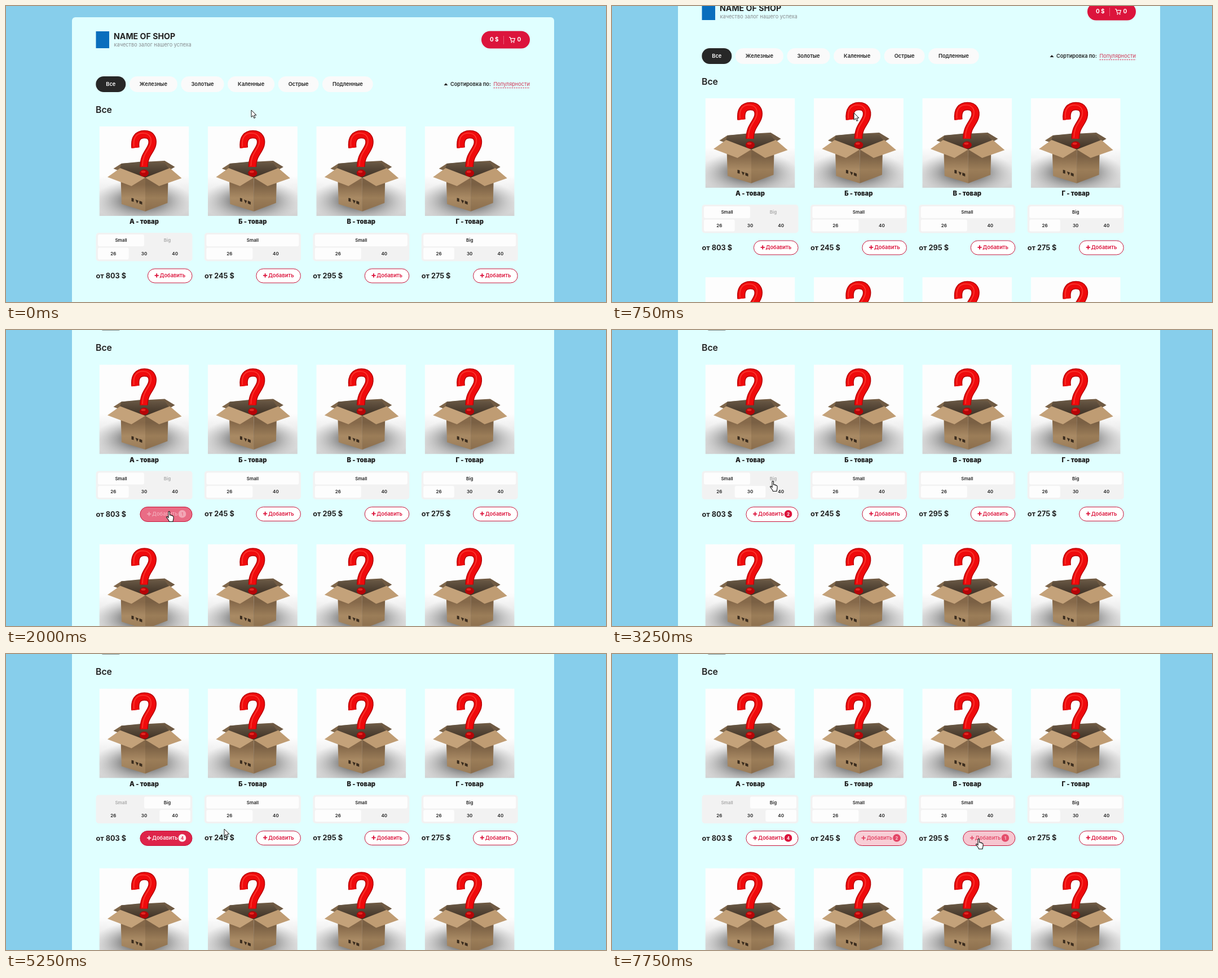
An HTML page that plays this animation: 1064x526 px, repeating every 8000 ms.

```html
<!DOCTYPE html>
<html lang="ru">
<head>
<meta charset="utf-8">
<title>Shop</title>
<style>
  html, body { margin: 0; width: 100%; height: 100%; overflow: hidden; background: #87ceeb; }
  svg { display: block; width: 1064px; height: 526px; font-family: Inter, "Open Sans", sans-serif; }
</style>
</head>
<body>
<svg viewBox="0 0 1064 526">
  <defs>
    <linearGradient id="floor" x2="0" y2="1">
      <stop offset=".55" stop-color="#fdfdfd"/><stop offset="1" stop-color="#d2d2d2"/>
    </linearGradient>
    <radialGradient id="shade">
      <stop offset=".35" stop-color="#666" stop-opacity=".8"/>
      <stop offset=".7" stop-color="#888" stop-opacity=".35"/>
      <stop offset="1" stop-color="#aaa" stop-opacity="0"/>
    </radialGradient>
    <linearGradient id="side" x2="0" y2="1">
      <stop offset=".2" stop-color="#86694a"/><stop offset=".6" stop-color="#a98a64"/><stop offset="1" stop-color="#9a7c58"/>
    </linearGradient>
    <linearGradient id="front" x2="0" y2="1">
      <stop offset=".2" stop-color="#7a6044"/><stop offset=".6" stop-color="#9b7d58"/><stop offset="1" stop-color="#8a6d4c"/>
    </linearGradient>
    <linearGradient id="inside" x2="0" y2="1">
      <stop offset="0" stop-color="#6b5a46"/><stop offset="1" stop-color="#3a2e23"/>
    </linearGradient>
    <clipPath id="crop"><rect width="159" height="159"/></clipPath>
    <path id="hook" fill="none" d="M64 38C62 21 69 14 80 14C92 14 96 23 93.500 33C90 45 79 51 79 72"/>
    <g id="photo" clip-path="url(#crop)">
      <rect width="159" height="159" fill="url(#floor)"/>
      <ellipse cx="77" cy="132" rx="88" ry="38" fill="url(#shade)"/>
      <path fill="#7f674b" d="M25 75L39 66L79 63L38 80Z"/>
      <path fill="#6f5a43" d="M79 63L116 61L134 72L122 79Z"/>
      <path fill="url(#inside)" d="M39 66L79 62L116 65L124 76L81.500 92L36 76Z"/>
      <ellipse cx="79.500" cy="83" rx="8" ry="6.500" fill="#b50508"/>
      <ellipse cx="78" cy="80.500" rx="4" ry="2" fill="#e62420"/>
      <path fill="url(#side)" d="M38 91L81.500 91L81.500 151L39.500 138Z"/>
      <path fill="url(#front)" d="M81.500 91L122 94L121 136L81.500 151Z"/>
      <path fill="#c4a27a" d="M37 74L81.500 91L57 106L14.500 90Z"/>
      <path fill="#bf9c73" d="M81.500 91L125 74L146 92L106 106Z"/>
      <path fill="#3a2c1e" d="M57 127l4 1v6l-4-1zM64 130l5.500 2-2.500 5zM71 132l5 2v5l-5-2z"/>
      <use href="#hook" stroke="#b80306" stroke-width="14.500"/>
      <use href="#hook" stroke="#f00a0c" stroke-width="11.500"/>
      <use href="#hook" stroke="#ff5a4a" stroke-width="1.500" opacity=".6" transform="translate(-2.500 -2)"/>
    </g>
    <path id="arrow" fill="#fff" stroke="#111" d="M0 0V12.500L2.900 9.800L4.900 14.400L7 13.500L5 9H9Z"/>
    <path id="hand" fill="#fff" stroke="#111" stroke-width="1.100" transform="translate(-5 0)" d="M4 1.500C4 0 6.500 0 6.500 1.500V7C8 6.400 9 7 9 7.600C10.200 7 11 7.800 11 8.400C12.300 8 13 8.800 13 9.800V13C13 15 12 16 12 18.500H5.500C5 16 3 14 .8 11.200C-.2 9.800 1.500 9 2.600 10L4 11.400Z"/>
  </defs>
  <g id="page"></g>
  <use id="cursor"/>
</svg>
<script>
const LOOP = 8000, STEP = 250, TICK = 10, FADE = 575;
const DARK = '#222', RED = '#dc143c', EDGE = '#c8143a';
const CARD_X = 159.5, CARD_Y = 214, PITCH = 192.4, ROW = 318;
const TYPE_Y = 192, SIZE_Y = 215.6, CELL_X = 3.5, CELL_H = 21, CELLS_W = 164;
const ADD_Y = 253, ADD_RIGHT = 170.5;
const $ = id => document.getElementById(id);

const tabs = ['Все', 'Железные', 'Золотые', 'Каленные', 'Острые', 'Подленные'];
const cards = [
  { name: 'А', price: 803, type: ['Small', 'Big'], size: [26, 30, 40] },
  { name: 'Б', price: 245, type: ['Small'], size: [26, 40] },
  { name: 'В', price: 295, type: ['Small'], size: [26, 40] },
  { name: 'Г', price: 275, type: ['Big'], size: [26, 30, 40] }
];

// stops of the pointer: time, x, y, click on arrival
const stops = [
  [0, 435, 185], [750, 429, 190], [1000, 301, 262], [2000, 289, 322, true],
  [2500, 246, 284, true], [3000, 282, 322, true], [3250, 285, 268], [3500, 285, 267, true],
  [4000, 300, 285, true], [4500, 290, 322, true], [4750, 290, 322, true], [5200, 290, 322],
  [5250, 387, 311], [6000, 461, 323, true], [6300, 437, 311], [6750, 437, 313],
  [7250, 461, 322, true], [7750, 650, 328, true]
];

const clamp = v => Math.min(1, Math.max(0, v));
const scrollAt = t => Math.round(305 * clamp((t - 628) / 372)) / 2;

function pointerAt(t) {
  const i = stops.findIndex(s => s[0] >= t);
  if (i < 1) return (i ? stops[stops.length - 1] : stops[0]).slice(1, 3);
  const [t0, x0, y0] = stops[i - 1], [t1, x1, y1] = stops[i];
  const k = 1 - (1 - (t - t0) / (t1 - t0)) ** 2;
  return [x0 + (x1 - x0) * k, y0 + (y1 - y0) * k];
}

const addBox = count => ({ x: count ? 78.4 : 91.9, h: count ? 26 : 25 });

// the control under the pointer
function hit([x, y], scroll, state) {
  const card = Math.floor((x - CARD_X) / PITCH);
  if (!state[card]) return null;
  const lx = x - CARD_X - card * PITCH, ly = y + scroll - CARD_Y;
  const add = addBox(state[card].count);
  if (lx >= add.x && lx <= ADD_RIGHT && ly >= ADD_Y && ly <= ADD_Y + add.h) return { card, part: 'add' };
  const part = ly >= TYPE_Y && ly <= TYPE_Y + CELL_H ? 'type'
    : ly >= SIZE_Y && ly <= SIZE_Y + CELL_H ? 'size' : '';
  const k = (lx - CELL_X) / CELLS_W;
  return part && k >= 0 && k < 1 ? { card, part, index: Math.floor(k * cards[card][part].length) } : null;
}

// replay the pointer from the start of the loop
function stateAt(time) {
  const state = cards.map(() => ({ type: 0, size: 0, count: 0, hover: 0 }));
  let over = null;
  for (let t = 0; t <= time; t += TICK) {
    over = hit(pointerAt(t), scrollAt(t), state);
    if (over && stops.some(s => s[0] === t && s[3])) {
      const s = state[over.card];
      if (over.part === 'add') s.count++;
      else s[over.part] = over.index;
    }
    state.forEach((s, i) => {
      const on = over && over.card === i && over.part === 'add';
      s.hover = clamp(s.hover + (on ? 1 : -1) * TICK / FADE);
    });
  }
  return { state, over };
}

const text = (x, y, s, size, weight = 600, fill = DARK, anchor = 'start') =>
  `<text x="${x}" y="${y}" font-size="${size}" font-weight="${weight}" fill="${fill}" text-anchor="${anchor}">${s}</text>`;
const box = (x, y, w, h, r, fill, extra = '') =>
  `<rect x="${x}" y="${y}" width="${w}" height="${h}" rx="${r}" fill="${fill}" ${extra}/>`;
const mix = k => `rgb(${[220, 20, 60].map(v => Math.round(255 + (v - 255) * k))})`;

function header() {
  const cart = `<path d="M892 55.500h2l2.200 7h4.800l1.300-4.800h-7.300" fill="none" stroke="#fff" stroke-width="1.200"/>
    <circle cx="896.500" cy="64.500" r="1.100" fill="#fff"/><circle cx="900.500" cy="64.500" r="1.100" fill="#fff"/>`;
  return box(117, 20, 855, 1000, 6, '#e0ffff') +
    box(159.5, 45, 23.5, 30, 0, '#0a6ebd') +
    text(191, 58.8, 'NAME OF SHOP', 14.2, 700) +
    text(191.5, 72.2, 'качество залог нашего успеха', 9.2, 400, '#87898c') +
    box(843, 44.5, 86, 31, 15.5, RED) +
    text(858, 63.4, '0 $', 10, 700, '#fff') +
    box(882, 53, 1, 15, 0, '#e8607a') + cart +
    text(906.5, 63.4, '0', 10, 700, '#fff') +
    `<path d="M776.500 141L780 137L783.500 141Z" fill="${DARK}"/>` +
    text(788, 142.4, 'Сортировка по:', 9.2) +
    text(864.5, 142.4, 'Популярности', 9.2, 400, '#cf3554') +
    `<path d="M864.500 145.500H929" stroke="${RED}" stroke-width=".9" stroke-dasharray="2.500 1.500"/>` +
    text(159, 189.6, 'Все', 15.8) +
    tabs.map((s, i) => `<g class="tab">${box(0, 125, 0, 28, 14, i ? '#fafafa' : '#272727')}${
      text(18, 142.4, s, 9.3, 600, i ? DARK : '#fff')}</g>`).join('');
}

function layTabs() {
  let x = 159.3;
  for (const tab of document.querySelectorAll('.tab')) {
    const width = tab.lastChild.getComputedTextLength() + 36;
    tab.firstChild.setAttribute('width', width);
    tab.setAttribute('transform', `translate(${x} 0)`);
    x += width + 6.5;
  }
}

function cells(items, chosen, y, idle) {
  const w = CELLS_W / items.length;
  return items.map((s, i) =>
    (i === chosen ? box(CELL_X + i * w, y, w, CELL_H, 3, '#fdfdfd') : '') +
    text(CELL_X + (i + .5) * w, y + 13.3, s, 8, 600, i === chosen ? DARK : idle, 'middle')).join('');
}

function button({ count, hover }) {
  const bg = mix(hover), ink = mix(1 - hover);
  const { x, h } = addBox(count), mid = ADD_Y + h / 2 - .6, plus = x + 15.8;
  const badge = count
    ? `<circle cx="153" cy="${mid}" r="6.800" fill="${ink}"/>` + text(153, mid + 2.7, count, 7.5, 700, bg, 'middle')
    : '';
  return box(x, ADD_Y, ADD_RIGHT - x, h, h / 2, bg, `stroke="${EDGE}"`) +
    `<path d="M${plus - 3.6} ${mid}h7.200m-3.600-3.600v7.200" stroke="${ink}" stroke-width="1.900"/>` +
    text(plus + 5.3, 268.4, 'Добавить', 9.3, 600, ink) + badge;
}

const controls = (card, s) =>
  box(0, 189, 171, 50.5, 5, '#f2f2f2') +
  cells(card.type, s.type, TYPE_Y, '#a8a8a8') +
  cells(card.size, s.size, SIZE_Y, DARK) +
  text(0, s.count ? 270.2 : 269.7, `от ${card.price} $`, 12.7, 700) +
  button(s);

$('page').innerHTML = header() + cards.map((c, i) =>
  `<g transform="translate(${CARD_X + i * PITCH} ${CARD_Y})"><use href="#photo" x="6"/>` +
  text(85.5, 173, `${c.name} - товар`, 11.2, 900, DARK, 'middle') +
  `<g id="card${i}"></g></g>`).join('') +
  `<g id="next">${cards.map((c, i) =>
    `<use href="#photo" x="${CARD_X + 6 + i * PITCH}" y="${CARD_Y + ROW}"/>`).join('')}</g>`;
layTabs();

function draw(t) {
  const { state, over } = stateAt(t);
  cards.forEach((c, i) => { $('card' + i).innerHTML = controls(c, state[i]); });
  // a counted button is taller and pushes the next row down
  $('next').setAttribute('transform', `translate(0 ${state.some(s => s.count) ? 1 : 0})`);
  $('page').setAttribute('transform', `translate(0 ${-scrollAt(t)})`);
  $('cursor').setAttribute('href', over ? '#hand' : '#arrow');
  $('cursor').setAttribute('transform', `translate(${pointerAt(t)})`);
}

const start = performance.now();
let shown = -1;
function tick(now) {
  const t = Math.floor(Math.max(0, now - start) % LOOP / STEP) * STEP;
  if (t !== shown) draw(shown = t);
  requestAnimationFrame(tick);
}
tick(start);
</script>
</body>
</html>
```
